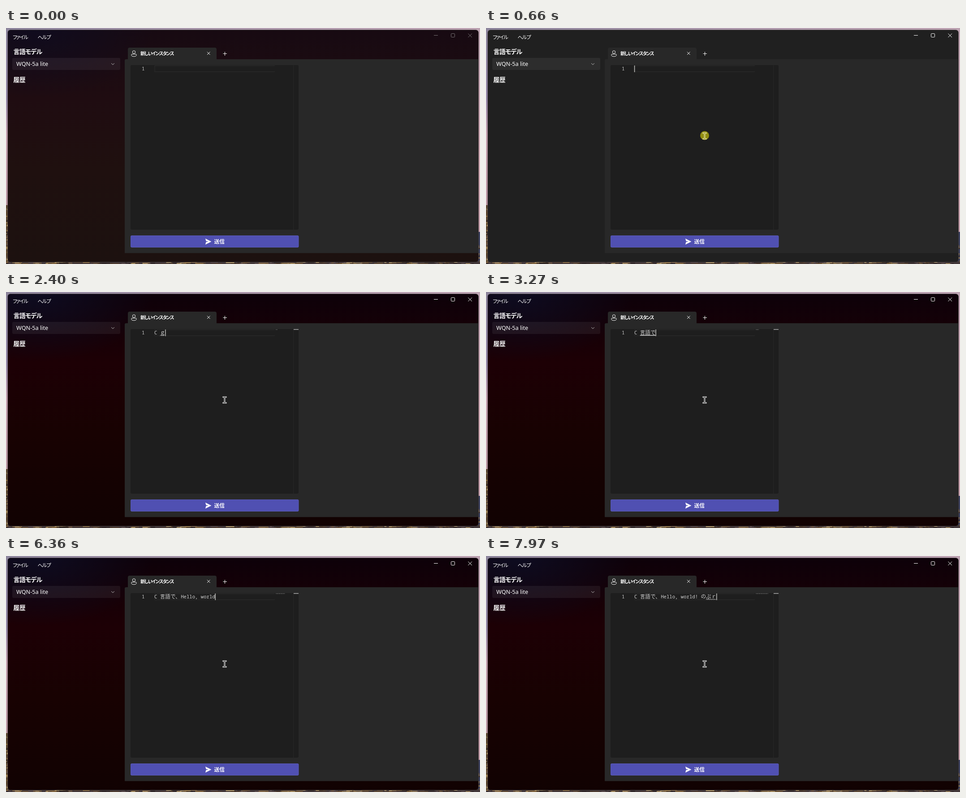
An HTML page that plays this animation: 1058x529 px, repeating every 8000 ms.

```html
<!DOCTYPE html>
<html lang="ja">
<head>
<meta charset="utf-8">
<title>Editor</title>
<style>
  html, body { margin: 0; width: 100%; height: 100%; overflow: hidden; background: #201a1c; }
  svg { display: block; width: 100vw; height: 100vh; }
  text { font-family: "Noto Sans CJK JP", "Noto Sans CJK", sans-serif; fill: #fff; }
  .kana { font-feature-settings: "palt"; }
  .bold { font-weight: 700; }
  .line { fill: none; stroke: #fff; stroke-width: 1; }
  .code text { fill: #d4d4d4; font-size: 11.6px; }
  .code .half { font-family: "Noto Sans Mono", monospace; font-size: 10.63px; }
</style>
</head>
<body>
<svg viewBox="0 0 1058 529" preserveAspectRatio="none">
  <defs>
    <linearGradient id="leftSky" x2="0" y2="1">
      <stop offset="0" stop-color="#8d859c"/>
      <stop offset=".3" stop-color="#9689a8"/>
      <stop offset=".45" stop-color="#c6a3b1"/>
      <stop offset=".75" stop-color="#bd9aa6"/>
    </linearGradient>
    <linearGradient id="topSky">
      <stop offset="0" stop-color="#8d859c"/>
      <stop offset=".5" stop-color="#ac98ab"/>
      <stop offset="1" stop-color="#bda3b2"/>
    </linearGradient>
    <linearGradient id="rightSky" x2="0" y2="1">
      <stop offset="0" stop-color="#bda3b2"/>
      <stop offset=".6" stop-color="#d0a9b3"/>
      <stop offset="1" stop-color="#bf9aa8"/>
    </linearGradient>
    <linearGradient id="warm" x2="0" y2="1">
      <stop offset="0" stop-color="#170a12"/>
      <stop offset=".3" stop-color="#1f0c11"/>
      <stop offset=".6" stop-color="#1f100f"/>
      <stop offset="1" stop-color="#1c110f"/>
    </linearGradient>
    <linearGradient id="deep" x2="0" y2="1">
      <stop offset="0" stop-color="#0d0109"/>
      <stop offset=".3" stop-color="#1d0005"/>
      <stop offset=".6" stop-color="#180202"/>
      <stop offset="1" stop-color="#110202"/>
    </linearGradient>
    <radialGradient id="navy" gradientUnits="userSpaceOnUse" cx="70" cy="0" r="260"
      gradientTransform="scale(1 .6)">
      <stop offset="0" stop-color="#0e0c21"/>
      <stop offset="1" stop-color="#0e0c21" stop-opacity="0"/>
    </radialGradient>
    <clipPath id="frame"><rect x="4" y="4.5" width="1050.5" height="520" rx="6"/></clipPath>
  </defs>

  <rect width="1058" height="529" fill="url(#leftSky)"/>
  <rect x="500" width="558" height="529" fill="url(#rightSky)"/>
  <rect width="1058" height="6" fill="url(#topSky)"/>
  <rect y="397" width="6" height="132" fill="#5e4a34"/>
  <rect x="1052" y="457" width="6" height="72" fill="#3b3f5c"/>
  <rect y="523" width="1058" height="6" fill="#43383a"/>
  <g id="city"></g>

  <g clip-path="url(#frame)">
    <rect width="1058" height="529" fill="#202020"/>
    <g id="warmLayer">
      <rect width="1058" height="529" fill="url(#warm)"/>
      <rect width="500" height="250" fill="url(#navy)" opacity=".8"/>
    </g>
    <g id="deepLayer">
      <rect width="1058" height="529" fill="url(#deep)"/>
      <rect width="500" height="250" fill="url(#navy)"/>
    </g>
    <path d="M265 504.5V73q0-3 3-3H272V48q0-4 4-4H466q4 0 4 4V70H1058V504.5Z" fill="#282828"/>
  </g>
  <rect x="4" y="4.5" width="1050.5" height="520" rx="6" fill="none" stroke="#3a3436" stroke-width=".7"/>

  <g id="windowButtons" class="line">
    <path d="M955 16.5H964M1031.5 12.5L1040 21M1040 12.5L1031.5 21"/>
    <rect x="993.5" y="12.5" width="8" height="8" rx="1"/>
  </g>

  <text class="kana" x="15" y="25" font-size="11.5" letter-spacing="-1.7">ファイル</text>
  <text class="kana" x="70.5" y="25" font-size="11.5" letter-spacing="-1.3">ヘルプ</text>
  <text class="kana bold" x="16.5" y="57.5" font-size="14" letter-spacing="-.8">言語モデル</text>
  <rect x="14" y="67" width="241" height="27" rx="3" fill="#fff" fill-opacity=".06"/>
  <text x="23" y="85" style="font:12.7px 'Noto Sans',sans-serif">WQN-5a lite</text>
  <path class="line" d="M235.2 79.2L238.5 82.3L241.8 79.2" style="stroke:#c8c8c8"/>
  <text class="bold" x="16.5" y="121" font-size="13.5">履歴</text>

  <g class="line">
    <circle cx="285.5" cy="54" r="3.2"/>
    <path d="M282 58.5H289Q291.3 58.5 291.3 60.5Q291 63.8 285.5 63.8Q280 63.8 279.7 60.5Q279.7 58.5 282 58.5Z"/>
    <path d="M449 53.5L455.5 60M455.5 53.5L449 60M484.5 57.5H493M488.5 53.5V62"/>
  </g>
  <text class="kana bold" x="300" y="61" font-size="10.5" letter-spacing="-1.5">新しいインスタンス</text>

  <rect x="278" y="83" width="375" height="369" rx="3" fill="#1e1e1e"/>
  <path d="M600 84.5H332V98H600" fill="none" stroke="#2a2a2a" stroke-width="1.3"/>
  <path d="M641.7 83V452" stroke="#292929"/>
  <g class="code"><text class="half" x="303" y="95" style="fill:#c6c6c6">1</text></g>
  <g id="code" class="code"></g>
  <path id="underline" fill="none" stroke="#d4d4d4"/>
  <rect id="caret" y="84" width="1.5" height="15" fill="#c0c0bd"/>
  <path id="minimap" stroke="#8b8b8b" stroke-width="1.2" stroke-dasharray="1.2 .9 2.3 .6" opacity=".75"/>
  <rect id="slider" x="642" y="83" width="11" height="2" fill="#8a8a8a"/>

  <rect x="278" y="465" width="375.5" height="27" rx="3" fill="#5050b2"/>
  <rect x="278.4" y="465.4" width="374.7" height="26.2" rx="2.6" fill="none" stroke="#fff" stroke-opacity=".08" stroke-width=".8"/>
  <path d="M445 472L458.5 478.7L445 485.5L446.5 479.8L452 478.7L446.5 477.6Z" fill="#fff"/>
  <text class="bold" x="464.5" y="483" font-size="11.7">送信</text>

  <g id="pointer">
    <circle id="click" r="10" fill="#918d10"/>
    <g fill="none" stroke-linecap="square">
      <path id="beamEdge" d="M-3 -5.5H3M-3 7.5H3M0 -5.5V7.5" stroke-width="3"/>
      <path id="beamCore" d="M-3 -5.5H3M-3 7.5H3M0 -5.5V7.5"/>
    </g>
  </g>
</svg>
<script>
const LOOP = 8000, HALF = 6.38, FULL = 11.6, LEFT = 331;
const $ = id => document.getElementById(id);
const svgNode = (tag, attrs, parent) => {
  const node = document.createElementNS('http://www.w3.org/2000/svg', tag);
  for (const key in attrs) node.setAttribute(key, attrs[key]);
  return parent.appendChild(node);
};

// Typing: time, committed text, text still in the input method, converted?
const C = 'C ', J = 'C 言語で', H = J + '、', W = H + 'Hello, world! ';
const typing = [
  [0, '', ''], [1470, 'C', ''], [1940, C, ''],
  [2400, C, 'ｇ'], [2470, C, 'げ'], [2670, C, 'げｎ'], [2740, C, 'げんｇ'],
  [2870, C, 'げんご'], [3000, C, 'げんごｄ'], [3200, C, 'げんごで'],
  [3270, C, '言語で', true], [3660, J, ''], [3930, J, '、'], [4390, H, ''],
  ...[4450, 4580, 4710, 4910, 5040, 5240, 5370, 5440, 5570, 5780, 6100, 6360, 6820, 7020]
    .map((time, i) => [time, W.slice(0, H.length + i + 1), '']),
  [7220, W, 'ｎ'], [7350, W, 'の'], [7560, W + 'の', ''],
  [7830, W + 'の', 'ｐ'], [7900, W + 'の', 'ぷ'], [7970, W + 'の', 'ぷｒ']
];

// Pointer: time, x, y
const moves = [[260, 585, 420], [330, 545, 345], [400, 510, 280], [530, 488, 241]];

// Backdrop: time, opacity of the warm layer, opacity of the deep layer
const backdrop = [[0, 1, 0], [120, .5, 0], [190, .2, 0], [260, 0, 0], [800, 1, 0], [940, 1, 1]];

const at = (table, t) => table.findLast(row => row[0] <= t);
const isHalf = ch => ch <= '~';
const measure = (s, half, full) => [...s].reduce((sum, ch) => sum + (isHalf(ch) ? half : full), 0);

function buildCity() {
  let seed = 11;
  const random = () => (seed = seed * 16807 % 2147483647) / 2147483647;
  const colours = ['#b08a4c', '#7d6038', '#d9bd80', '#241c1c', '#5b432d', '#6e5d5c'];
  const speck = (x, y, w, h) => svgNode('rect', {
    x, y, width: w, height: h, opacity: .8, fill: colours[Math.floor(random() * colours.length)]
  }, $('city'));
  for (let i = 0; i < 150; i++) speck(random() * 1058, 524 + random() * 4, 4 + random() * 20, 1 + random());
  for (let i = 0; i < 50; i++) speck(random() * 2, 398 + random() * 128, 3, 1 + random() * 3);
  for (let i = 0; i < 14; i++) speck(1054 + random() * 3, 485 + random() * 40, 2, 1 + random() * 3);
}

let shown;
function drawText(row) {
  if (row === shown) return;
  shown = row;
  const [, done, composing, converted] = row;
  const text = done + composing;
  $('code').replaceChildren();
  let x = LEFT;
  for (const run of text.match(/[ -~]+|[^ -~]+/g) || []) {
    svgNode('text', { x, y: 95, class: isHalf(run[0]) ? 'half' : 'full' }, $('code')).textContent = run;
    x += measure(run, HALF, FULL);
  }
  $('caret').setAttribute('x', x - .2);

  const start = LEFT + measure(done, HALF, FULL);
  let line = '';
  if (converted) line = `M${start} 97.3H${x - .5}`;
  else if (composing) {
    line = `M${start} 98`;
    for (let i = 0; start + i * 2 < x - 2; i++) line += `l2 ${i % 2 ? 1.5 : -1.5}`;
  }
  $('underline').setAttribute('d', line);
  $('underline').setAttribute('stroke-width', converted ? 1.4 : .9);
  $('minimap').setAttribute('d', text ? `M602 84.3h${measure(text, .93, 1.86)}` : '');
  $('slider').style.display = text ? '' : 'none';
}

function render(t) {
  const [, warm, deep] = at(backdrop, t);
  $('warmLayer').style.opacity = warm;
  $('deepLayer').style.opacity = deep;
  $('windowButtons').style.stroke = t < 660 ? '#777274' : '#fff';
  drawText(at(typing, t));
  $('caret').style.display = t < 660 || (t >= 1200 && t < 1470) ? 'none' : '';

  const move = at(moves, t);
  const clicked = t >= 660 && t < 800;
  $('pointer').style.display = move ? '' : 'none';
  if (move) $('pointer').setAttribute('transform', `translate(${move[1]} ${move[2]})`);
  $('click').style.display = clicked ? '' : 'none';
  $('beamEdge').style.stroke = clicked ? '#eeeba8' : '#e8e8e8';
  $('beamCore').style.stroke = clicked ? '#8b8718' : '#262626';
}

buildCity();
const begin = performance.now();
(function tick() {
  render((performance.now() - begin) % LOOP);
  requestAnimationFrame(tick);
})();
</script>
</body>
</html>
```
